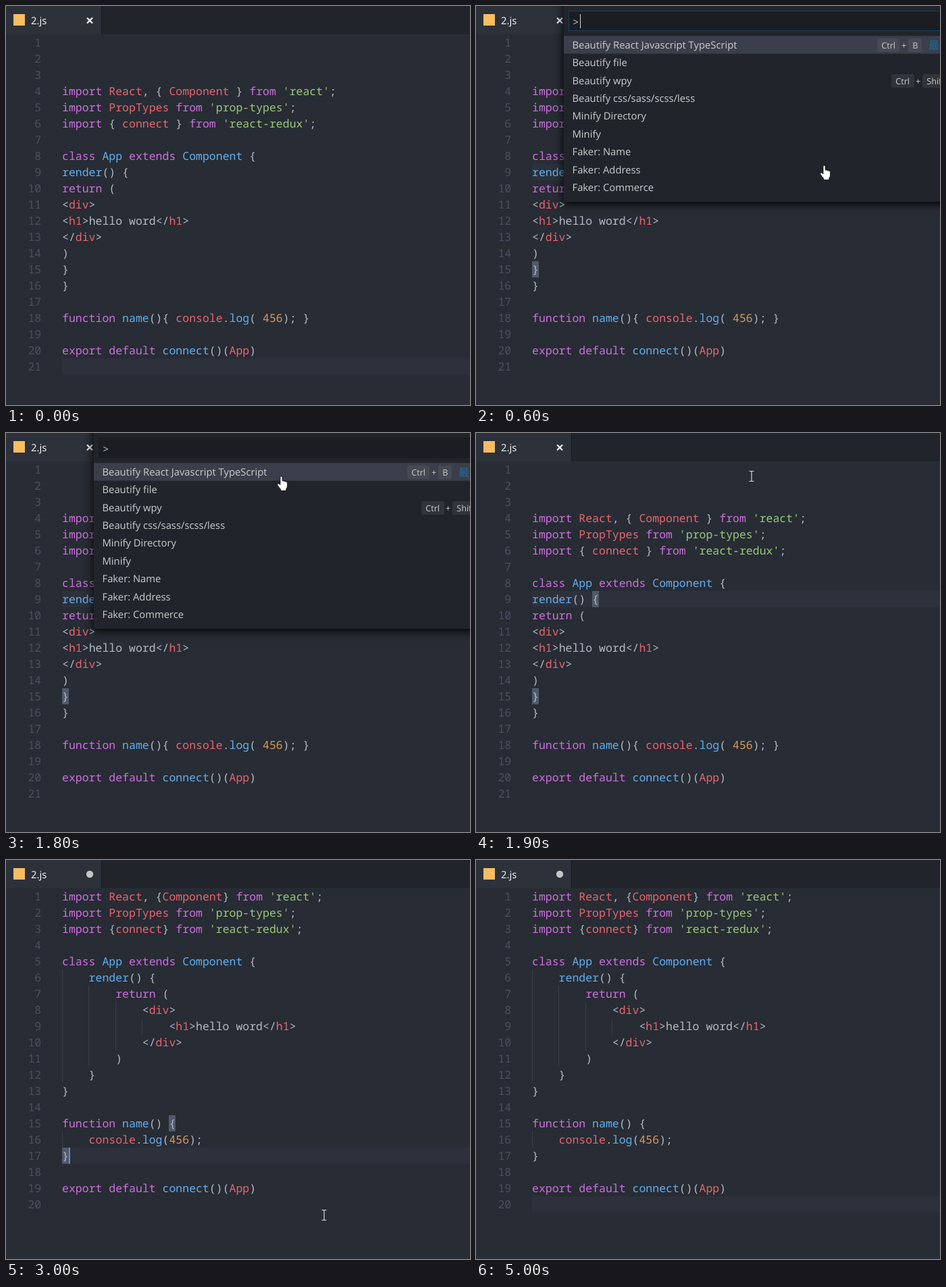
These frames come from a looping animation (687x591 px, 5.1 s). An HTML page:

```html
<!DOCTYPE html>
<html lang="en">
<head>
<meta charset="utf-8">
<title>Code formatting</title>
<style>
html, body { margin: 0; width: 100%; height: 100%; overflow: hidden; background: #282c34; }
svg { display: block; width: 687px; height: 591px; }
text { white-space: pre; text-rendering: geometricPrecision; }
.code { font: 16.5px "Noto Sans Mono", "DejaVu Sans Mono", monospace; fill: #b3bac6; }
.number { fill: #495162; text-anchor: end; }
.keyword { fill: #cd6fe0; }
.name { fill: #e8656f; }
.call { fill: #61afef; }
.string { fill: #98c97a; }
.digit { fill: #d6995f; }
.ui { font: 14.8px "Open Sans", "Noto Sans", sans-serif; fill: #ccc; }
.key { font-size: 12.6px; }
.group { font-family: "Noto Sans CJK SC", "Noto Sans CJK", sans-serif; font-size: 16px; fill: #1c6c9e; }
#palette { filter: drop-shadow(0 3px 7px #000); }
</style>
</head>
<body>
<svg id="stage" viewBox="0 0 687 591"></svg>
<script>
const LOOP = 5100, STEP = 100;
const LEFT = 83, TOP = 42, LINE = 24, CHAR = 9.9;
const LIST_TOP = 44.3, ITEM = 26.4;

const rawCode = `


import React, { Component } from 'react';
import PropTypes from 'prop-types';
import { connect } from 'react-redux';

class App extends Component {
render() {
return (
<div>
<h1>hello word</h1>
</div>
)
}
}

function name(){ console.log( 456); }

export default connect()(App)
`;
const cleanCode = `import React, {Component} from 'react';
import PropTypes from 'prop-types';
import {connect} from 'react-redux';

class App extends Component {
    render() {
        return (
            <div>
                <h1>hello word</h1>
            </div>
        )
    }
}

function name() {
    console.log(456);
}

export default connect()(App)
`;
const commands = ['Beautify React Javascript TypeScript', 'Beautify file', 'Beautify wpy',
  'Beautify css/sass/scss/less', 'Minify Directory', 'Minify',
  'Faker: Name', 'Faker: Address', 'Faker: Commerce'];

const rowY = row => TOP + (row - 1) * LINE;
const rect = (x, y, w, h, fill, extra = '') =>
  `<rect x="${x}" y="${y}" width="${w}" height="${h}" fill="${fill}" ${extra}/>`;
const label = (x, y, text, type = '') => `<text class="ui ${type}" x="${x}" y="${y}">${text}</text>`;
const escapeText = text => text.replace(/</g, '&lt;').replace(/>/g, '&gt;');

const tokens = /(?<string>'[^']*')|(?<keyword>\b(?:import|from|class|extends|return|function|export|default)\b)|(?<call>(?<=(?:class|extends) )\w+|\w+(?=\())|(?<digit>\b\d+\b)|(?<plain>hello word)|(?<name>\w+)|[^\w']+/g;

function highlight(line) {
  return [...line.matchAll(tokens)].map(({ 0: text, groups }) => {
    const type = Object.keys(groups).find(key => groups[key]);
    return `<tspan class="${type || 'plain'}">${escapeText(text)}</tspan>`;
  }).join('');
}

function codeBlock(id, code) {
  const lines = code.split('\n').map((line, i) => {
    const body = line.trimStart();
    const x = LEFT + (line.length - body.length) * CHAR, y = rowY(i + 1) + 18;
    return `<text class="code number" x="52.2" y="${y}">${i + 1}</text>` +
      `<text class="code" x="${x}" y="${y}">${highlight(body)}</text>`;
  });
  return `<g id="${id}">${lines.join('')}</g>`;
}

const guide = (level, first, last) =>
  rect(Math.floor(LEFT + level * 4 * CHAR), rowY(first), 1, (last - first + 1) * LINE, '#3b4048');

const keyCap = (x, y, w, text) =>
  rect(x, y, w, 20, 'rgba(128,128,128,.17)', 'rx="3"') + label(x + 6.3, y + 14.7, text, 'key');

const palette = `<g id="palette">
  ${rect(130, -20, 640, 310, '#21252b')}
  ${rect(137, 7, 620, 30, '#1b1d23')}
  <rect id="focus" x="137.5" y="7.5" width="620" height="29" fill="none" stroke="#14455e"/>
  ${label(143.5, 29, '&gt;')}
  ${rect(154, 12, 1, 21, '#d0d0d0', 'id="inputCaret"')}
  ${rect(130, LIST_TOP, 640, ITEM, '#292d35', 'id="hover"')}
  ${rect(130, LIST_TOP, 640, ITEM, '#3a3f4b')}
  ${commands.map((text, i) => label(142.5, 62.8 + i * ITEM, text)).join('')}
  ${keyCap(594, 48, 33, 'Ctrl')}${label(630, 63, '+', 'key')}${keyCap(640, 48, 20, 'B')}
  ${label(670, 63.5, '最近使用', 'group')}
  ${keyCap(615, 101, 34, 'Ctrl')}${label(651, 116, '+', 'key')}${keyCap(661, 101, 38, 'Shift')}
</g>`;

const stage = document.getElementById('stage');
stage.innerHTML = `
  ${rect(0, 0, 687, 591, '#282c34')}
  ${rect(LEFT, 0, 604, LINE, '#2c313c', 'id="row"')}
  ${rect(0, 0, 10, LINE, '#515a6b', 'id="open"')}
  ${rect(0, 0, 10, LINE, '#515a6b', 'id="close"')}
  <g id="guides">${guide(0, 6, 12)}${guide(1, 7, 11)}${guide(2, 8, 10)}${guide(3, 9, 9)}${guide(0, 16, 16)}</g>
  ${codeBlock('raw', rawCode)}
  ${codeBlock('clean', cleanCode)}
  ${rect(0, 0, 2, LINE, '#528bff', 'id="caret"')}
  ${rect(0, 0, 687, TOP, '#21252b')}
  ${rect(0, 0, 141, TOP, '#2c313a')}
  ${rect(141, 0, 1, TOP, '#181a1f')}
  ${rect(11, 12, 17, 17, '#f8bc62')}
  <text class="ui" x="37" y="26.5" style="fill:#fff">2.js</text>
  <path id="cross" d="M120 17.5l8 8m0-8l-8 8" stroke="#f0f0f0" stroke-width="2.3"/>
  <circle id="dot" cx="124" cy="21" r="5.2" fill="#c5c5c5"/>
  ${palette}
  <g id="beam" fill="none">
    <path d="M-3.5-7.5h2.5q1 0 1 1v13q0 1-1 1h-2.5M3.5-7.5h-2.5q-1 0-1 1M3.5 7.5h-2.5q-1 0-1-1" stroke="#d8d8d8" stroke-width="1.2"/>
  </g>
  <path id="hand" fill="#fff" stroke="#000" stroke-width=".8" d="M-2 12V1.7a1.6 1.6 0 0 1 3.2 0V7q1.6-.8 2.6.6 1.6-.6 2.4.7 2-.4 2.4 1.4v4.5q0 2.8-1.8 4.8v2.6h-8v-2q-2.4-2.6-4.8-6.4-.8-2.2.9-2.4 1.5 0 3.1 2z"/>`;

const part = {};
stage.querySelectorAll('[id]').forEach(el => part[el.id] = el);

const editorStates = [
  { at: 0, row: 21, col: 0 },
  { at: 400, row: 9, col: 10, pair: [[9, 9], [15, 0]] },
  { at: 2000, row: 7, col: 4 },
  { at: 2700, row: 17, col: 1 },
  { at: 3000, row: 17, col: 1, pair: [[15, 16], [17, 0]] },
  { at: 3300, row: 20, col: 0 }
];
const caretOn = [[400, 900], [2000, 2500], [2700, 3500], [4000, 4500], [4900, 5000]];
const inputCaretOn = [[600, 1100], [1600, 1800]];
const pointerPath = [
  [100, 680, 88], [200, 612, 165], [300, 522, 230], [400, 516, 236],
  [800, 516, 236], [900, 514, 231], [1200, 442, 116], [1400, 408, 64],
  [2000, 408, 64], [2300, 409, 100], [2700, 458, 438], [2900, 477, 518],
  [3000, 471, 526], [3300, 471, 526], [3400, 490, 490], [3700, 674, 123], [3800, 680, 101]
];

const within = (t, spans) => spans.some(([from, to]) => t >= from && t < to);
const show = (el, visible) => el.setAttribute('display', visible ? 'inline' : 'none');

function place(el, row, col) {
  el.setAttribute('x', Math.round(LEFT + col * CHAR));
  el.setAttribute('y', rowY(row));
}

function pointerAt(t) {
  const next = pointerPath.findIndex(([time]) => time > t);
  if (next === 0) return null;
  if (next < 0) return t < 3900 ? pointerPath.at(-1).slice(1) : null;
  const [t0, x0, y0] = pointerPath[next - 1], [t1, x1, y1] = pointerPath[next];
  const k = (t - t0) / (t1 - t0);
  return [x0 + (x1 - x0) * k, y0 + (y1 - y0) * k];
}

function render(t) {
  const state = editorStates.findLast(s => s.at <= t);
  const formatted = t >= 2000, open = t >= 600 && t < 1900;

  show(part.raw, !formatted);
  show(part.cross, !formatted);
  for (const id of ['clean', 'guides', 'dot']) show(part[id], formatted);

  part.row.setAttribute('y', rowY(state.row));
  place(part.caret, state.row, state.col);
  show(part.caret, within(t, caretOn));
  [part.open, part.close].forEach((el, i) => {
    show(el, state.pair);
    if (state.pair) place(el, ...state.pair[i]);
  });

  show(part.palette, open);
  show(part.focus, t < 1800);
  show(part.inputCaret, within(t, inputCaretOn));

  const pointer = pointerAt(t);
  show(part.beam, pointer && !open);
  show(part.hand, pointer && open);
  if (!pointer) return;
  const move = `translate(${pointer.map(Math.round)})`;
  part.beam.setAttribute('transform', move);
  part.hand.setAttribute('transform', move);

  const item = Math.floor((pointer[1] - LIST_TOP) / ITEM);
  show(part.hover, t >= 900 && item > 0);
  part.hover.setAttribute('y', LIST_TOP + item * ITEM);
}

const start = performance.now();
function tick() {
  const t = (performance.now() - start) % LOOP;
  render(Math.floor(t / STEP) * STEP);
  requestAnimationFrame(tick);
}
tick();
</script>
</body>
</html>
```
